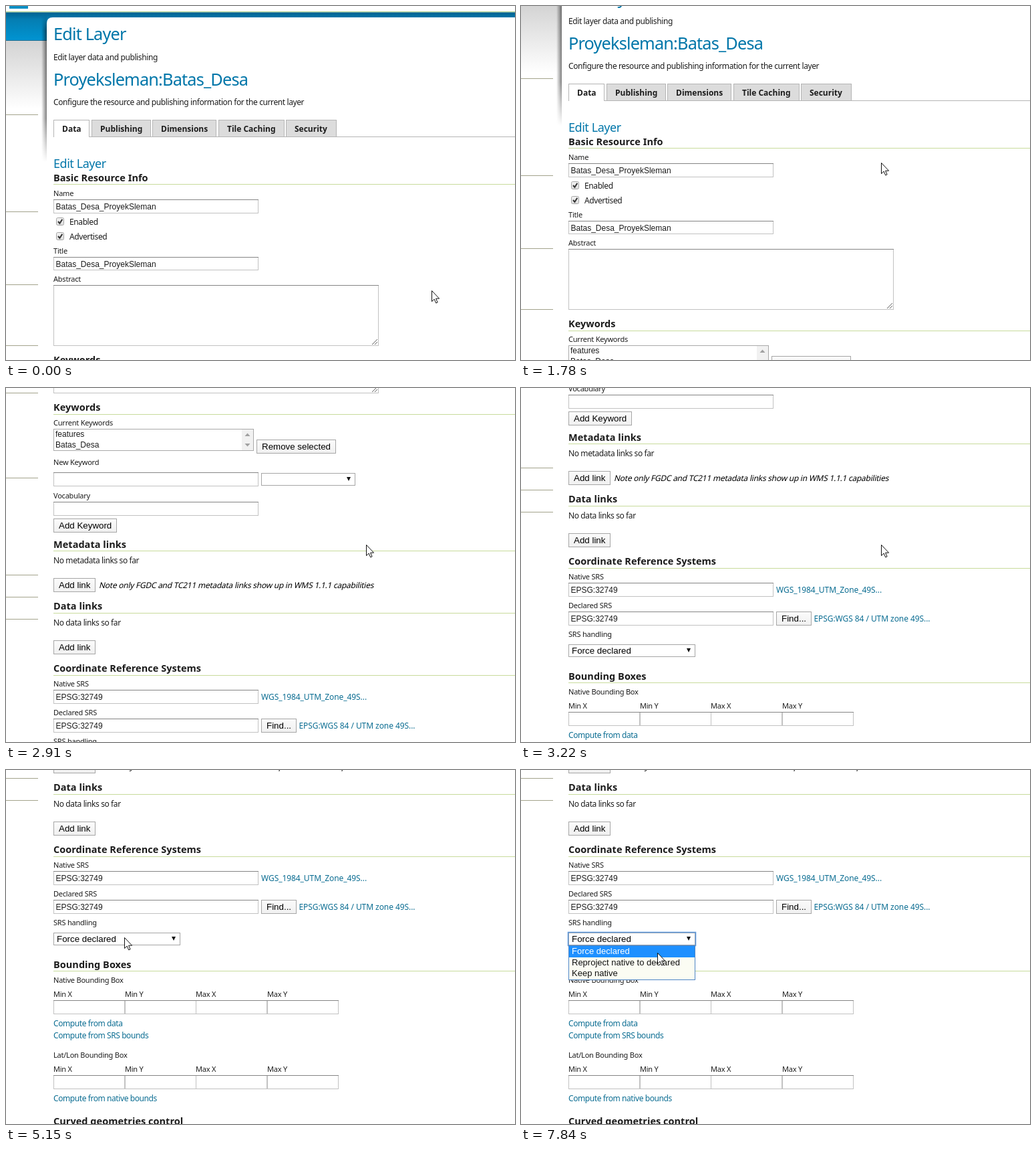
Animation, 762 px wide and 529 px high, one loop 8000 ms. Source, as an HTML page:

```html
<!DOCTYPE html>
<html lang="en">
<head>
<meta charset="utf-8">
<title>Edit Layer</title>
<style>
  html, body { margin: 0; width: 100%; height: 100%; overflow: hidden; background: #fff; }
  svg { display: block; width: 762px; height: 529px; }
  text { font-family: "Noto Sans", sans-serif; fill: #1c1c1c; white-space: pre; }
  .big { font-size: 25.3px; letter-spacing: -.033em; fill: #0076a9; }
  .sub { font-size: 18px; letter-spacing: -.025em; fill: #0076a9; }
  .head { font-size: 14.5px; font-weight: 700; letter-spacing: .03px; }
  .tab { font-size: 12px; font-weight: 700; }
  .body { font-size: 12px; letter-spacing: -.033em; }
  .small { font-size: 11px; letter-spacing: -.02em; }
  .note { font-size: 12px; letter-spacing: -.25px; fill: #000; }
  .link { font-size: 12px; letter-spacing: -.035em; fill: #0b6d92; }
  .srs { font-size: 12px; letter-spacing: -.07px; fill: #0b6d92; }
  .field, .ctl, .item { font-family: "Liberation Sans", Arial, sans-serif; }
  .field { font-size: 12px; }
  .ctl { font-size: 13.333px; fill: #000; }
  .item { font-size: 13px; fill: #111; }
</style>
</head>
<body>
<svg viewBox="0 0 762 529" xmlns="http://www.w3.org/2000/svg">
  <defs>
    <linearGradient id="blue" x2="0" y2="1">
      <stop offset="0" stop-color="#00618f"/><stop offset=".25" stop-color="#057eb2"/><stop offset="1" stop-color="#0094d2"/>
    </linearGradient>
    <linearGradient id="grey" x2="0" y2="1">
      <stop offset="0" stop-color="#d3d3d3"/><stop offset="1" stop-color="#fff"/>
    </linearGradient>
    <linearGradient id="shade">
      <stop offset="0" stop-color="#000" stop-opacity="0"/><stop offset="1" stop-color="#000" stop-opacity=".5"/>
    </linearGradient>
    <linearGradient id="fade" x2="0" y2="1">
      <stop offset="0" stop-color="#000"/><stop offset=".1" stop-color="#fff"/>
      <stop offset=".7" stop-color="#fff"/><stop offset="1" stop-color="#000"/>
    </linearGradient>
    <linearGradient id="btn" x2="0" y2="1">
      <stop offset="0" stop-color="#fbfbfb"/><stop offset="1" stop-color="#f0f0f0"/>
    </linearGradient>
    <linearGradient id="box" x2="0" y2="1">
      <stop offset="0" stop-color="#f4f4f4"/><stop offset="1" stop-color="#dedede"/>
    </linearGradient>
    <mask id="soft"><rect x="50" y="15" width="14" height="218" fill="url(#fade)"/></mask>
    <clipPath id="roll"><rect id="rollBox" x="70" y="1062" width="192" height="53"/></clipPath>
  </defs>
  <rect width="762" height="529" fill="#fff"/>
  <g id="page"></g>
  <circle id="ring" r="11.3" fill="none" stroke="#555" stroke-opacity=".7"/>
  <path id="arrow" d="M.5.5V16.6L4.2 13.1 6.7 18.9 9.1 17.9 6.6 12.2H11.6Z" fill="#fff" stroke="#111"/>
</svg>
<script>
const $ = id => document.getElementById(id);
const parts = [];
const add = s => parts.push(s);
const text = (cls, x, y, s, extra = '') => add(`<text class="${cls}" x="${x}" y="${y}" ${extra}>${s}</text>`);
const rect = (x, y, w, h, fill, extra = '') => add(`<rect x="${x}" y="${y}" width="${w}" height="${h}" fill="${fill}" ${extra}/>`);
const path = (d, stroke, fill = 'none', extra = '') => add(`<path d="${d}" stroke="${stroke}" fill="${fill}" ${extra}/>`);
const frame = (x, y, w, h, stroke, fill = '#fff') => rect(x + .5, y + .5, w - 1, h - 1, fill, `stroke="${stroke}"`);

function input(x, y, w, value = '', h = 21) {
  frame(x, y, w, h, '#c2c2c2');
  path(`M${x} ${y + .5}H${x + w}`, '#858585');
  if (value) text('field', x + 3.5, y + 15, value);
}
function button(x, y, w, label) {
  frame(x, y, w, 21, '#a6a6a6', 'url(#btn)');
  text('ctl', x + 8, y + 15, label);
}
function select(x, y, w, value) {
  frame(x, y, w, 19, '#a6a6a6');
  path(`M${x + w - 13} ${y + 6}h6l-3 6z`, 'none', '#111');
  text('ctl', x + 5, y + 14, value);
}
function check(y, label) {
  rect(75.5, y + .5, 11, 11, 'url(#box)', 'rx="2" stroke="#a5a5a5"');
  path(`M78 ${y + 6}l2.4 2.8L84.3 ${y + 2.7}`, '#333', 'none', 'stroke-width="2"');
  text('body', 95, y + 11, label);
}
function section(y, label, gap = 4) {
  text('head', 71, y, label);
  rect(71, y + gap, 691, 1, '#c8db9c');
}
function bounds(y) {
  ['Min X', 'Min Y', 'Max X', 'Max Y'].forEach((s, i) => {
    const x = Math.round(71 + i * 106.7);
    text('small', x, y, s);
    input(x, y + 5, 107);
  });
}

// header and side column
rect(5, -24, 28, 28, '#0a8fc4');
rect(0, 8, 762, 1.5, '#b5d593');
rect(0, 9.5, 762, 42, 'url(#blue)');
rect(0, 51, 70, 1, '#1c6c90');
rect(0, 52, 70, 102, 'url(#grey)');
rect(53, 15, 8, 218, 'url(#shade)', 'mask="url(#soft)"');
path('M61 1500V26Q61 17 70 17H762V1500Z', 'none', '#fff');
[162, 307, 416, 507, 634, 779, 812, 845].forEach(y => rect(0, y, 48, 1, '#a3a38c'));

text('big', 71, 51, 'Edit Layer');
text('body', 71, 81, 'Edit layer data and publishing');
text('big', 71, 119, 'Proyeksleman:Batas_Desa');
text('body', 71, 148, 'Configure the resource and publishing information for the current layer');

rect(71, 195, 691, 1, '#b5b5b5');
[['Data', 71, 54], ['Publishing', 128, 89], ['Dimensions', 219, 96], ['Tile Caching', 318, 99], ['Security', 419, 76]]
  .forEach(([s, x, w], i) => {
    frame(x, 170, w, 26, '#b5b5b5', i ? '#dcdcdc' : '#fff');
    if (!i) rect(x + 1, 195, w - 2, 1, '#fff');
    text('tab', x + 13, 188, s);
  });

text('sub', 71, 242, 'Edit Layer');
section(262, 'Basic Resource Info');
text('small', 71, 284, 'Name');
input(71, 289, 307, 'Batas_Desa_ProyekSleman');
check(316, 'Enabled');
check(338, 'Advertised');
text('small', 71, 370, 'Title');
input(71, 375, 307, 'Batas_Desa_ProyekSleman', 20);
text('small', 71, 412, 'Abstract');
input(71, 417, 487, '', 91);
path('M548 506L556 498M552 506L556 502', '#666');

section(534, 'Keywords', 5);
text('small', 71, 556, 'Current Keywords');
frame(71, 561, 300, 33, '#a9a9a9');
rect(353, 562, 17, 31, '#f1f1f1');
path('M357.5 572h8l-4-4.5zM357.5 583h8l-4 4.5z', 'none', '#a0a0a0');
text('field', 74, 573, 'features');
text('field', 74, 589, 'Batas_Desa');
button(375, 577, 119, 'Remove selected');
text('small', 71, 615, 'New Keyword');
input(71, 626, 307);
select(382, 627, 141, '');
text('small', 71, 665, 'Vocabulary');
input(71, 670, 307);
button(71, 695, 95, 'Add Keyword');

section(739, 'Metadata links');
text('body', 71, 762, 'No metadata links so far');
button(71, 784, 63, 'Add link');
text('note', 0, 0, 'Note only FGDC and TC211 metadata links show up in WMS 1.1.1 capabilities',
  'transform="translate(139 799) skewX(-13)"');
section(831, 'Data links', 5);
text('body', 71, 855, 'No data links so far');
button(71, 877, 63, 'Add link');

section(924, 'Coordinate Reference Systems', 5);
text('small', 71, 946, 'Native SRS');
input(71, 951, 307, 'EPSG:32749');
text('srs', 382, 966, 'WGS_1984_UTM_Zone_49S...');
text('small', 71, 989, 'Declared SRS');
input(71, 994, 307, 'EPSG:32749');
button(382, 994, 53, 'Find...');
text('srs', 438.5, 1009, 'EPSG:WGS 84 / UTM zone 49S...');
text('small', 71, 1032, 'SRS handling');
select(71, 1043, 190, 'Force declared');

section(1096, 'Bounding Boxes');
text('small', 71, 1118, 'Native Bounding Box');
bounds(1139);
text('link', 71, 1183, 'Compute from data');
text('link', 71, 1201, 'Compute from SRS bounds');
text('small', 71, 1230, 'Lat/Lon Bounding Box');
bounds(1251);
text('link', 71, 1295, 'Compute from native bounds');
section(1330, 'Curved geometries control');

// drop-down list
add('<g id="list">');
rect(70.5, 1042.5, 191, 20, 'none', 'stroke="#5b97dd" stroke-width="1.5"');
add('<g clip-path="url(#roll)">');
frame(71, 1062, 190, 52, '#4f86c6', '#fbfcf3');
add('<rect id="pick" x="72" width="188" height="17" fill="#1e90ff"/>');
['Force declared', 'Reproject native to declared', 'Keep native']
  .forEach((s, i) => text('item', 76, 1075 + i * 16.5, s, `id="item${i}"`));
add('</g></g>');
$('page').innerHTML = parts.join('');

// held steps: [time, value...]
const scroll = [
  [0, 0], [1710, 2], [1780, 54], [1860, 160], [1950, 200],
  [2190, 202], [2270, 250], [2340, 358], [2420, 400],
  [2660, 401], [2740, 450], [2830, 494], [2910, 500],
  [3050, 502], [3120, 553], [3200, 660], [3280, 700],
  [4060, 701], [4140, 750], [4220, 793], [4300, 800]
];
const cursor = [[0, 637, 425], [70, 636, 423]];
for (let i = 1; i <= 11; i++) {
  const u = i / 11, e = u * u * (3 - 2 * u);
  cursor.push([390 + (i - 1) * 78, Math.round(636 - 97 * e), Math.round(423 - 189 * e)]);
}
[[530, 240], [482, 268], [402, 300], [300, 317], [190, 306], [127, 282], [115, 260], [177, 250], [182, 251], [184, 252], [185, 252]]
  .forEach(([x, y], i) => cursor.push([4610 + i * 77, x, y]));
cursor.push(
  [5460, 192, 246], [5520, 197, 241], [6070, 199, 248],
  [6600, 200, 272], [6680, 201, 292], [6910, 202, 296], [6980, 202, 300], [7060, 202, 301],
  [7300, 203, 290], [7380, 203, 279], [7450, 203, 274], [7610, 204, 275], [7680, 204, 274], [7840, 204, 273]
);
const clicks = [[1170, 1250], [5690, 5840], [6140, 6460]];
const roll = [[0, 0], [6220, 27], [6290, 53]];
const picks = [[0, 0], [6680, 1], [6980, 2], [7300, 1], [7380, 0]];

const at = (keys, t) => keys.reduce((a, k) => k[0] <= t ? k : a);

function draw(t) {
  const [, x, y] = at(cursor, t);
  const pick = at(picks, t)[1];
  const show = (el, on) => el.setAttribute('visibility', on ? 'visible' : 'hidden');
  $('page').setAttribute('transform', `translate(0 ${-at(scroll, t)[1]})`);
  $('arrow').setAttribute('transform', `translate(${x} ${y})`);
  $('ring').setAttribute('transform', `translate(${x} ${y})`);
  show($('ring'), clicks.some(([a, b]) => t >= a && t < b));
  show($('list'), t >= 6140);
  $('rollBox').setAttribute('height', at(roll, t)[1]);
  $('pick').setAttribute('y', 1063 + pick * 16.5);
  for (let i = 0; i < 3; i++) $('item' + i).style.fill = i === pick ? '#fff' : '#111';
}

function tick() {
  draw(performance.now() % 8000);
  requestAnimationFrame(tick);
}
tick();
</script>
</body>
</html>
```
